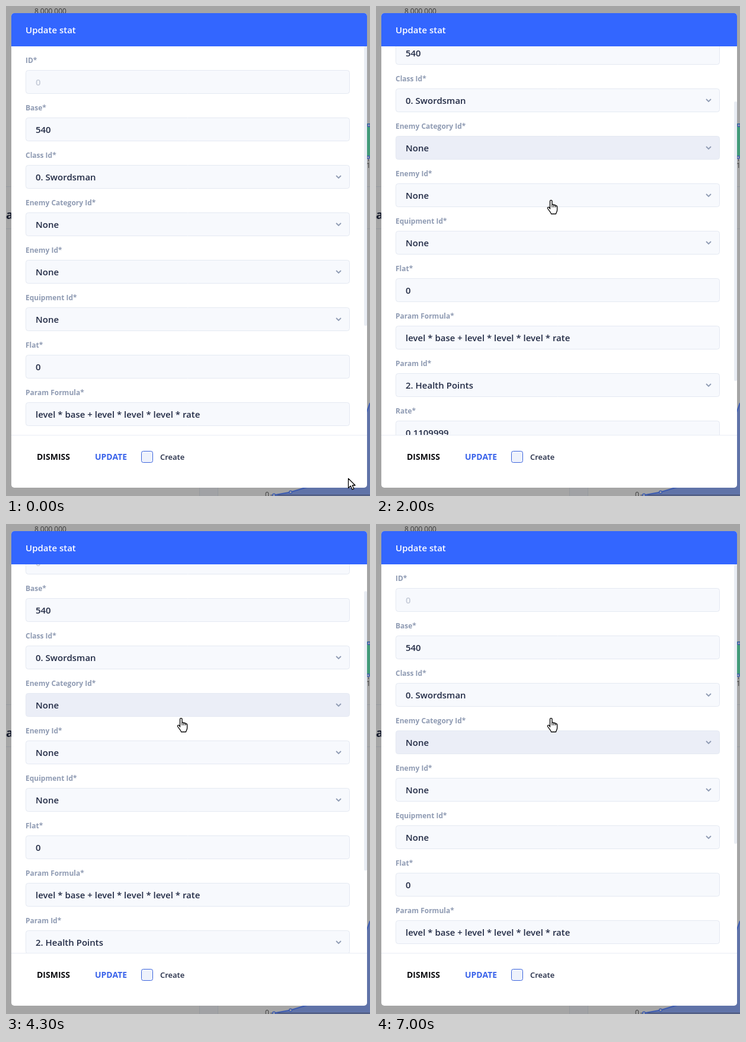
Recreate the animation shown at these times as an HTML page with a canvas. Size 614 by 826 pixels, loop 7100 ms.

```html
<!DOCTYPE html>
<html lang="en">
<head>
<meta charset="utf-8">
<title>Update stat</title>
<style>
  html, body { margin: 0; width: 100%; height: 100%; overflow: hidden; background: #a5a5a5; }
  canvas { display: block; }
</style>
</head>
<body>
<canvas id="stage" width="614" height="826"></canvas>
<script>
const ctx = document.getElementById('stage').getContext('2d');
const LOOP = 7100, STEP = 100;
const BLUE = '#3366ff', INK = '#222b45', HINT = '#8f9bb3';
const VIEW = { top: 68, bottom: 723 };

const fields = [
  { label: 'ID*', value: '0', disabled: true },
  { label: 'Base*', value: '540' },
  { label: 'Class Id*', value: '0. Swordsman', select: true },
  { label: 'Enemy Category Id*', value: 'None', select: true, hover: true },
  { label: 'Enemy Id*', value: 'None', select: true },
  { label: 'Equipment Id*', value: 'None', select: true },
  { label: 'Flat*', value: '0' },
  { label: 'Param Formula*', value: 'level * base + level * level * level * rate' },
  { label: 'Param Id*', value: '2. Health Points', select: true },
  { label: 'Rate*', value: '0.1109999' },
  { label: 'Stat Type*', value: '100' }
];

// [time, scroll offset]
const scrollKeys = [
  [500, 0], [800, 90], [1200, 200], [1500, 257], [1800, 257], [2200, 0],
  [2500, 0], [2900, 179], [3200, 257], [3600, 257], [4300, 63], [4600, 0],
  [4700, 0], [5200, 204], [5500, 257], [6300, 257], [7000, 0]
];

function keyed(keys, t) {
  if (t <= keys[0][0]) return keys[0][1];
  for (let i = 1; i < keys.length; i++) {
    const [t0, a] = keys[i - 1], [t1, b] = keys[i];
    if (t <= t1) return a + (b - a) * (t - t0) / (t1 - t0);
  }
  return keys[keys.length - 1][1];
}

function text(str, x, y, size, weight, color) {
  ctx.font = `${weight} ${size}px "Open Sans", sans-serif`;
  ctx.fillStyle = color;
  ctx.fillText(str, x, y);
}

function rect(x, y, w, h, color) {
  ctx.fillStyle = color;
  ctx.fillRect(x, y, w, h);
}

function roundBox(x, y, w, h, r, fill, stroke) {
  ctx.beginPath();
  ctx.roundRect(x, y, w, h, r);
  ctx.fillStyle = fill;
  ctx.fill();
  if (stroke) {
    ctx.lineWidth = 1;
    ctx.strokeStyle = stroke;
    ctx.stroke();
  }
}

function polyline(points, width, color) {
  ctx.beginPath();
  points.forEach(([x, y]) => ctx.lineTo(x, y));
  ctx.lineWidth = width;
  ctx.strokeStyle = color;
  ctx.stroke();
}

function marker(x, y) {
  ctx.beginPath();
  ctx.arc(x, y, 2.3, 0, Math.PI * 2);
  ctx.fillStyle = '#a5a5a5';
  ctx.fill();
  ctx.lineWidth = 1.5;
  ctx.strokeStyle = '#3c5bb0';
  ctx.stroke();
}

function drawBackdrop() {
  rect(0, 0, 614, 826, '#a5a5a5');
  text('8,000,000', 48, 13, 12, 400, '#3b3b3b');
  text('a', 0, 359, 20, 700, '#171c2d');
  for (const y of [304, 375]) rect(0, y, 614, 1, '#969a9f');
  rect(327, 812, 30, 14, '#a1a2a5');
  for (const x of [326, 357]) rect(x, 812, 1, 14, '#969a9f');

  rect(609, 199, 5, 54, '#429a78');
  rect(609, 198, 5, 2, '#2b8c66');
  marker(612, 201);
  marker(611, 255);
  rect(611, 258, 1, 4, '#444');
  text('1', 608, 273, 12, 400, '#3b3b3b');

  const curve = [[452, 824.5], [480, 819.5], [508, 811], [560, 770], [609, 683], [614, 669]];
  ctx.beginPath();
  [...curve, [614, 826], [452, 826]].forEach(([x, y]) => ctx.lineTo(x, y));
  ctx.fillStyle = '#6073a8';
  ctx.fill();
  rect(446, 824, 168, 1, '#43485a');
  polyline(curve, 2, '#3c5bb0');
  marker(452, 824.5);
  marker(480, 819.5);
  text('0', 437, 828, 12, 400, '#3b3b3b');
}

function drawField(field, y, hovered) {
  text(field.label, 33, y - 12, 12, 700, HINT);
  const fill = field.hover && hovered ? '#ebeef7' : '#f7f9fd';
  roundBox(33.5, y + 0.5, 546, 39, 4, fill, '#e4e9f2');
  text(field.value, 50, y + 26, 15, 600, field.disabled ? '#c4cad7' : INK);
  if (field.select) polyline([[557, y + 18], [561, y + 22], [565, y + 18]], 1.8, HINT);
}

function drawDialog(scroll, hovered) {
  roundBox(9, 12, 600, 800, 5, '#fff');
  ctx.save();
  ctx.beginPath();
  ctx.rect(9, VIEW.top, 600, VIEW.bottom - VIEW.top);
  ctx.clip();
  fields.forEach((field, i) => drawField(field, 108 + 80 * i - scroll, hovered));
  roundBox(604, VIEW.top + scroll * 0.72, 5, 471, 2, '#e9edf4');
  ctx.restore();

  roundBox(9, 12, 600, 56, [5, 5, 0, 0], BLUE);
  text('Update stat', 33, 46, 15, 600, '#fff');
  rect(9, VIEW.bottom, 600, 1, '#e9edf4');
  text('DISMISS', 52, 765, 14, 700, '#0b0b0f');
  text('UPDATE', 150, 765, 14, 700, '#3a63ea');
  roundBox(228.5, 750.5, 19, 19, 3, '#eef2fc', '#3a63dc');
  text('Create', 260, 765, 13, 600, INK);
}

function drawShape(x, y, path) {
  ctx.save();
  ctx.translate(x, y);
  const shape = new Path2D(path);
  ctx.lineJoin = 'round';
  ctx.lineWidth = 1.3;
  ctx.fillStyle = '#fff';
  ctx.strokeStyle = '#000';
  ctx.fill(shape);
  ctx.stroke(shape);
  ctx.restore();
}

function drawArrow(x, y) {
  drawShape(x, y, 'M.5 .5V16.5L4.3 13L7 19L9.8 17.8L7.2 12H12Z');
}

function drawHand(x, y) {
  drawShape(x, y, 'M-1.5 14V1.2C-1.5 -1.2 2 -1.2 2 1.2V7.5C2 5.8 5 5.9 5 7.8V8.5' +
    'C5 6.7 8 6.9 8 8.8V9.6C8 8 10.6 8.3 10.6 10V16C10.6 19 8.8 20 8.5 22.5H.5' +
    'C.2 20 -2.5 18 -5.3 13.5C-6.5 11.2 -3.8 10.3 -2.5 12Z');
  polyline([[x + 2, y + 7.5], [x + 2, y + 11.5]], 1.1, '#000');
  polyline([[x + 5, y + 8], [x + 5, y + 11.5]], 1.1, '#000');
  polyline([[x + 8, y + 9], [x + 8, y + 11.5]], 1.1, '#000');
}

function drawPointer(t) {
  const p = Math.min(t / 400, 1);
  const k = p * p * (3 - 2 * p);
  const x = 577 + (295 - 577) * k;
  const y = 796 + (328 - 796) * k;
  (y > VIEW.bottom ? drawArrow : drawHand)(x, y);
}

function render(now) {
  const t = Math.floor((now % LOOP) / STEP) * STEP;
  drawBackdrop();
  drawDialog(Math.round(keyed(scrollKeys, t)), t >= 300);
  drawPointer(t);
}

const start = performance.now();
function loop() {
  render(performance.now() - start);
  requestAnimationFrame(loop);
}
loop();
</script>
</body>
</html>
```
